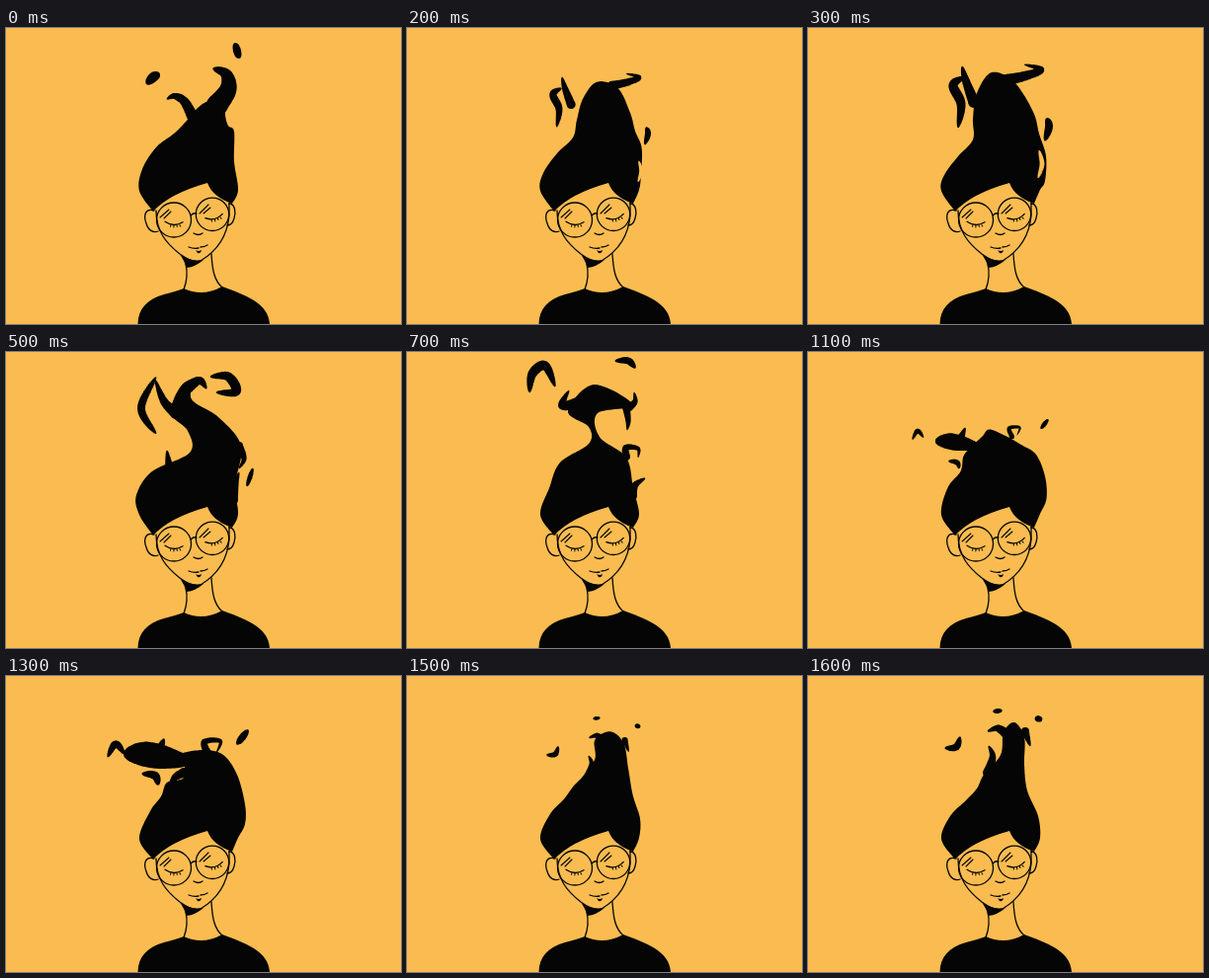
Write an HTML page with a canvas that moves like this. It is 400 px wide and 300 px high and loops after 1.7 s.

```html
<!DOCTYPE html>
<html lang="en">
<head>
<meta charset="utf-8">
<title>Drifting hair</title>
<style>
html, body { margin: 0; width: 100%; height: 100%; overflow: hidden; background: #fabc50; }
canvas { display: block; width: 400px; height: 300px; }
</style>
</head>
<body>
<canvas id="stage"></canvas>
<script>
const PAPER = '#fabc50', INK = '#050505', LOOP = 1700, STEP = 100;
const canvas = document.getElementById('stage');
const ctx = canvas.getContext('2d');
const ratio = window.devicePixelRatio || 1;
canvas.width = 400 * ratio;
canvas.height = 300 * ratio;
ctx.scale(ratio, ratio);

const points = text => text.split(' ').map(p => p.split(',').map(Number));
const mix = (a, b, k) => a.map((v, n) => v + (b[n] - v) * k);

// A strand is a spine with a half width: locks taper from the root,
// wisps and gaps taper at both ends.
const strand = ([width, spine]) => ({ width, spine: spline(points(spine)) });
const pose = (at, crown, { locks = [], wisps = [], gaps = [] }) => ({
  at, crown: points(crown),
  locks: locks.map(strand), wisps: wisps.map(strand), gaps: gaps.map(strand)
});
const taper = u => (1 - u) ** 0.6;
const leaf = u => Math.sin(Math.PI * u) ** 0.6;

// Every crown has eleven key points: five up the left, the top, five down the right.
const poses = [
  pose(0, '138,143 152,121 170,107 182,95 193,82 205,74 222,72 222,88 225,99 231,105 231,135', {
    locks: [[6, '190,92 181,75 171,69 163,72'], [11, '214,78 225,62 223,47 210,41']],
    wisps: [[5, '143,56 149,50 154,47'], [4, '232,16 236,30']]
  }),
  pose(300, '138,149 152,130 167,113 167,92 171,66 186,45 209,55 228,85 234,107 241,130 240,155', {
    locks: [[6, '168,75 160,54 156,39'], [6, '200,53 222,48 236,42 219,37']],
    wisps: [[5, '158,50 147,58 155,77 152,101'], [4, '242,92 244,100 240,114']],
    gaps: [[2.5, '234,124 237,138 233,152']]
  }),
  pose(500, '132,145 148,121 186,102 184,80 167,62 176,36 190,28 188,48 215,66 238,95 232,135', {
    locks: [[6, '172,62 160,50 151,28'], [6, '184,36 196,29 203,37'], [4, '165,115 163,100'],
      [4, '236,95 241,108 236,118'], [4, '231,150 233,133 236,122']],
    wisps: [[4, '152,25 137,57 152,83'], [5, '207,25 225,25 233,40 213,41'], [2.5, '250,118 244,136']]
  }),
  pose(700, '144,138 155,112 184,93 184,76 163,60 189,33 229,54 193,62 195,86 222,107 229,138', {
    locks: [[6, '172,52 157,54 164,39'], [4, '225,56 231,50 230,41'], [4, '222,56 224,70 223,79'],
      [4, '222,106 222,97 234,98 234,107'], [5, '228,146 231,135 241,128']],
    wisps: [[5, '124,41 127,22 140,14 150,35'], [3.5, '211,9 224,9 231,16']]
  }),
  pose(900, '137,138 152,120 152,103 153,87 172,79 192,77 198,94 212,108 228,108 238,122 241,147', {
    locks: [[6, '187,82 191,72 181,64 191,53'], [4, '198,92 197,83 203,77'], [5, '221,110 219,99 229,95']],
    wisps: [[5, '157,95 136,101 155,119'], [8, '162,38 176,36 202,13 234,31'], [6, '222,16 218,38 216,63'],
      [4, '124,14 130,7 138,5'], [2.5, '228,3 234,8'], [4, '215,77 223,71 233,80']],
    gaps: [[3, '149,97 153,118']]
  }),
  pose(1300, '146,137 157,122 163,108 179,104 181,92 175,80 200,75 220,80 234,100 242,130 242,150', {
    locks: [[5, '155,76 160,64'], [5, '180,98 171,103 165,113'], [4, '205,80 201,67 217,66 213,78']],
    wisps: [[13, '122,79 138,79 158,82 186,87'], [3.5, '103,82 111,69 120,79'],
      [4, '138,99 151,101 154,110'], [3.5, '234,69 245,55']]
  }),
  pose(1600, '144,142 160,126 171,114 178,100 195,80 198,57 209,47 219,62 219,90 222,116 233,142', {
    locks: [[5, '200,58 192,53 182,56'], [4, '220,56 225,71'], [5, '182,98 187,82 183,71']],
    wisps: [[3.5, '139,73 150,72 154,62'], [2.5, '188,36 196,35'], [3, '231,43 236,44']]
  })
];
const [leftSide, rightSide] = [points('149,186 135,165'), points('235,164 229,178')];

function spline(pts, steps = 16) {
  const out = [];
  for (let i = 0; i < pts.length - 1; i++) {
    const b = pts[i], c = pts[i + 1];
    const a = pts[i - 1] || b, d = pts[i + 2] || c;
    for (let s = 0; s < steps; s++) {
      const u = s / steps;
      out.push([0, 1].map(n => b[n] + u / 2 * (c[n] - a[n] +
        u * (2 * a[n] - 5 * b[n] + 4 * c[n] - d[n] +
        u * (3 * (b[n] - c[n]) + d[n] - a[n])))));
    }
  }
  return [...out, pts[pts.length - 1]];
}

function drawStrand({ width, spine }, profile, drift, color = INK) {
  const size = 1 - Math.abs(drift) * 0.7;
  const middle = spine[spine.length >> 1];
  ctx.fillStyle = color;
  ctx.beginPath();
  spine.forEach((p, i) => {
    const [x, y] = mix(middle, p, size);
    const radius = Math.max(0, width * size * profile(i / (spine.length - 1)) || 0);
    ctx.moveTo(x, y);
    ctx.arc(x, y - drift * 22, radius, 0, 7);
  });
  ctx.fill();
}

function drawCrown(crown) {
  ctx.fillStyle = INK;
  ctx.beginPath();
  spline([...leftSide, ...crown, ...rightSide]).forEach(p => ctx.lineTo(...p));
  ctx.quadraticCurveTo(209, 171, 204, 157);
  ctx.quadraticCurveTo(165, 168, 149, 186);
  ctx.fill();
}

// Between poses the crown bends over while strands rise, fade out and grow back.
function drawHair(time) {
  let i = poses.length - 1;
  while (poses[i].at > time) i--;
  const from = poses[i], to = poses[i + 1] || from;
  const k = (time - from.at) / (to.at - from.at || 1);
  const near = k < 0.5 ? from : to;
  const drift = k < 0.5 ? k : k - 1;
  drawCrown(from.crown.map((p, n) => mix(p, to.crown[n], k)));
  near.locks.forEach(lock => drawStrand(lock, taper, drift));
  near.wisps.forEach(wisp => drawStrand(wisp, leaf, drift));
  near.gaps.forEach(gap => drawStrand(gap, leaf, drift, PAPER));
}

function stroke(path, width = 1.3) {
  ctx.lineWidth = width;
  ctx.stroke(new Path2D(path));
}

function fill(path) {
  ctx.fillStyle = INK;
  ctx.fill(new Path2D(path));
}

function ring(x, y, r) {
  ctx.lineWidth = 1.3;
  ctx.beginPath();
  ctx.arc(x, y, r, 0, 7);
  ctx.stroke();
}

function drawBody() {
  fill('M133.5 300C134 284 143 275 160 270Q172 267 180 264Q199 273 219 262C240 270 266 278 267 300Z');
  stroke('M182 239Q185 252 180 265M208 229C209 246 211 256 219 263');
  fill('M176 229Q187 238 200 235Q192 242 183 243Q180 235 176 229Z');
}

function drawFace() {
  stroke('M152 185C152 206 162 218 176 229Q188 238 197 236C212 227 224 213 226 190V177');
  stroke('M150 185C141 182 139 190 142 198C144 205 149 208 154 206');
  stroke('M226 178C232 178 233 187 231 193Q229 200 224 200');
}

function drawEye(x, y, tilt) {
  ctx.save();
  ctx.translate(x, y);
  ctx.rotate(tilt);
  stroke('M-9 -2Q0 4 9 -2');
  for (let lash = -1; lash < 3; lash++) {
    const root = lash * 3;
    stroke(`M${root} 1L${root + lash * 0.4} ${3.5 - Math.abs(lash) * 0.6}`, 1);
  }
  ctx.restore();
}

function drawFeatures() {
  ring(170, 194.5, 17.5);
  ring(209, 188.8, 16.7);
  stroke('M187 190Q190 187 193 188');
  stroke('M156 192L165 184M160 193L167 186M196 188L205 179M200 188L207 182', 1.1);
  drawEye(170, 198.5, 0.03);
  drawEye(211, 192.5, -0.24);
  stroke('M190 208Q195 211 199 208');
  stroke('M185 222Q190 224 195 223M197 222Q201 222 204 220');
  fill('M192 225Q195 227 198 225Q197 229 194 228Z');
}

function frame(now) {
  const time = Math.floor(now % LOOP / STEP) * STEP;
  ctx.fillStyle = PAPER;
  ctx.fillRect(0, 0, 400, 300);
  ctx.strokeStyle = INK;
  ctx.lineCap = ctx.lineJoin = 'round';
  drawBody();
  drawFace();
  drawHair(time);
  drawFeatures();
  requestAnimationFrame(frame);
}
requestAnimationFrame(frame);
</script>
</body>
</html>
```
